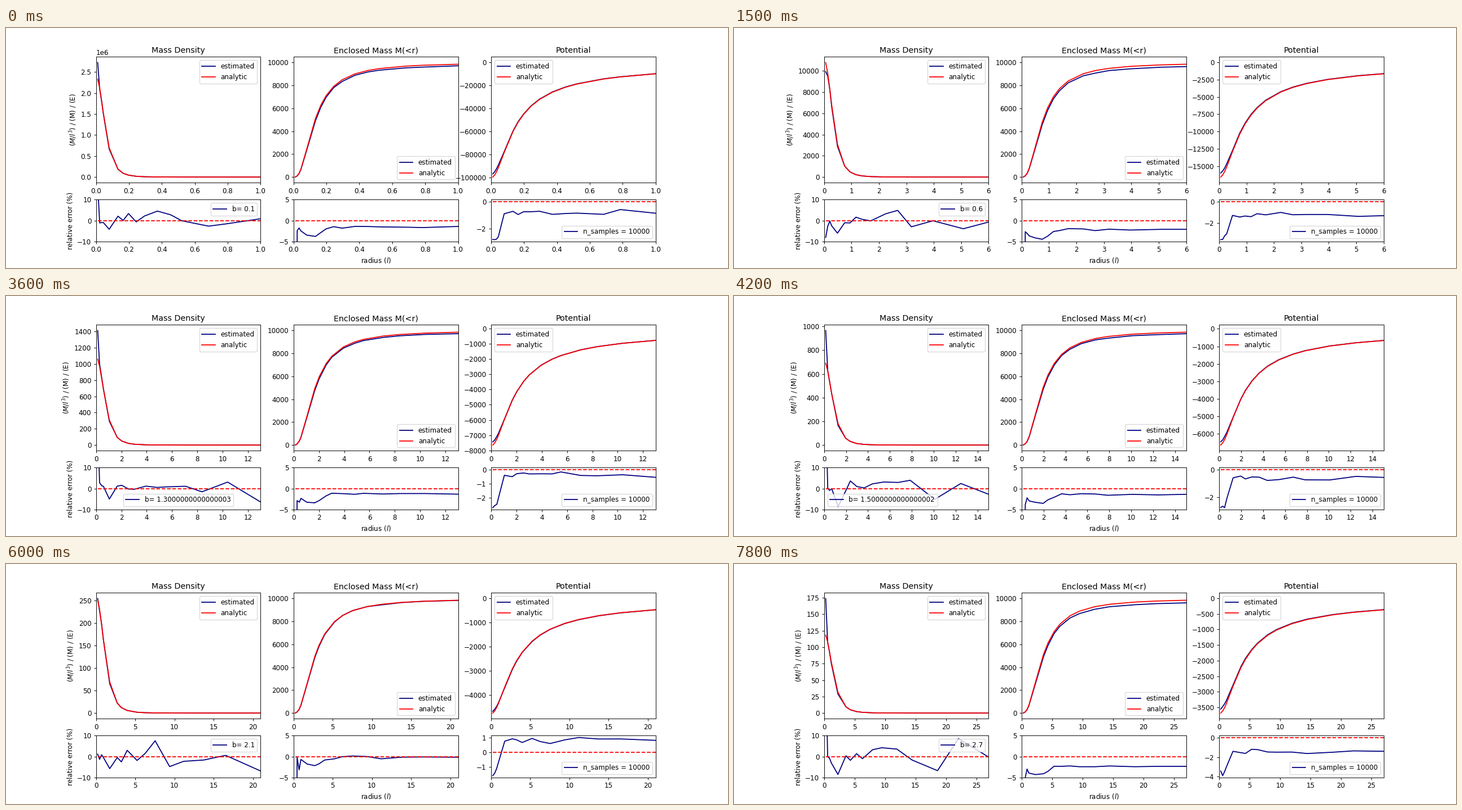
Recreate the animation shown at these times as a matplotlib script. Size 1280x427 px, loop 8000 ms.

```python
import numpy as np
import matplotlib.pyplot as plt
from matplotlib.animation import FuncAnimation

DPI = 256 / 3
MASS = 10000
TICK, HOLD, FRAMES = 100, 3, 80   # a new scale length b every 3 ticks

# key points over the steps of b
KEYS = [0, 5, 9, 14, 18, 23, 26]
LEVEL = [-.8, -1.3, -.2, -.6, .55, 1.2, -1.5]   # potential error, percent
PEAK = [17, -8, 23, 40, -4, 9, 47]              # innermost density error, percent
FAR = [500, 500, 62, 70, 500, 70, 500]          # outermost radius, units of b


def bump(u, center, width):
    return np.exp(-((u - center) / width) ** 2)


def sample(step):
    """Bin radii in units of b, and errors of density, mass and potential."""
    rng = np.random.default_rng(step)
    level, peak, far = (np.interp(step, KEYS, row) for row in (LEVEL, PEAK, FAR))
    u = np.concatenate([np.linspace(.1, .46, 4), [.83], np.geomspace(1.3, 10, 11)])
    u[1:-1] *= rng.uniform(.96, 1.04, u.size - 2)
    u = np.append(u, far)

    noise = rng.normal(size=(3, u.size))
    rho = 2.5 * bump(u, 4.5, 2) - 5 * bump(u, .83, .25)
    rho += noise[0] * np.minimum(1.5 + .3 * u, 4)
    mass = .95 * level - .85 - 2.3 * bump(u, 1.1, .7)
    mass += noise[1] * (.15 + 8 * np.exp(-u / .15))
    pot = level - 2.2 * np.exp(-(u / .6) ** 4) + .12 * noise[2]
    rho[0], mass[0] = peak, -100      # no mass inside the first bin
    rho[-1] = mass[-1] = 0            # everything is enclosed at the end
    return u, rho, mass, pot


def plummer(r, b):
    s = r * r + b * b
    return (3 * MASS * b * b / (4 * np.pi) * s ** -2.5,
            MASS * r ** 3 * s ** -1.5,
            -MASS * s ** -.5)


fig, axes = plt.subplots(2, 3, figsize=(1280 / DPI, 427 / DPI), dpi=DPI,
                         gridspec_kw={"height_ratios": [3, 1]})
fig.subplots_adjust(left=.1247, right=.8998)
titles = ["Mass Density", "Enclosed Mass M(<r)", "Potential"]
places = ["upper right", "lower right", "upper left"]
notes = ["b= 0.1", None, "n_samples = 10000"]

panels = []
for top, low, title, place, note in zip(*axes, titles, places, notes):
    est, = top.plot([], [], color="navy", label="estimated")
    ana, = top.plot([], [], color="red", label="analytic")
    top.set_title(title)
    top.legend(loc=place)
    err, = low.plot([], [], color="navy", label=note)
    zero, = low.plot([], [], "--", color="red")
    if note:
        low.legend(loc="best")
    panels.append((top, low, est, ana, err, zero))

axes[0, 0].set_ylabel(r"$(M/l^3)$ / (M) / (E)")
axes[1, 0].set_ylabel("relative error (%)")
axes[1, 1].set_xlabel("radius ($l$)")
axes[1, 0].set_ylim(-10, 10)
axes[1, 1].set_ylim(-5, 5)
b_text = axes[1, 0].get_legend().get_texts()[0]


def update(i):
    step = i // HOLD
    b = 0.1 + 0.1 * step
    u, *errors = sample(step)
    r = u * b
    for (top, low, est, ana, err, zero), exact, e in zip(panels, plummer(r, b), errors):
        est.set_data(r, exact * (1 + e / 100))
        ana.set_data(r, exact)
        err.set_data(r, e)
        zero.set_data(r, 0 * r)
        for ax in (top, low):
            ax.set_xlim(0, 10 * b)
            ax.relim()
            ax.autoscale_view(scalex=False)
    b_text.set_text(f"b= {b}")
    return []


anim = FuncAnimation(fig, update, frames=FRAMES, interval=TICK,
                     repeat=True, repeat_delay=0, blit=False)
plt.show()
```
